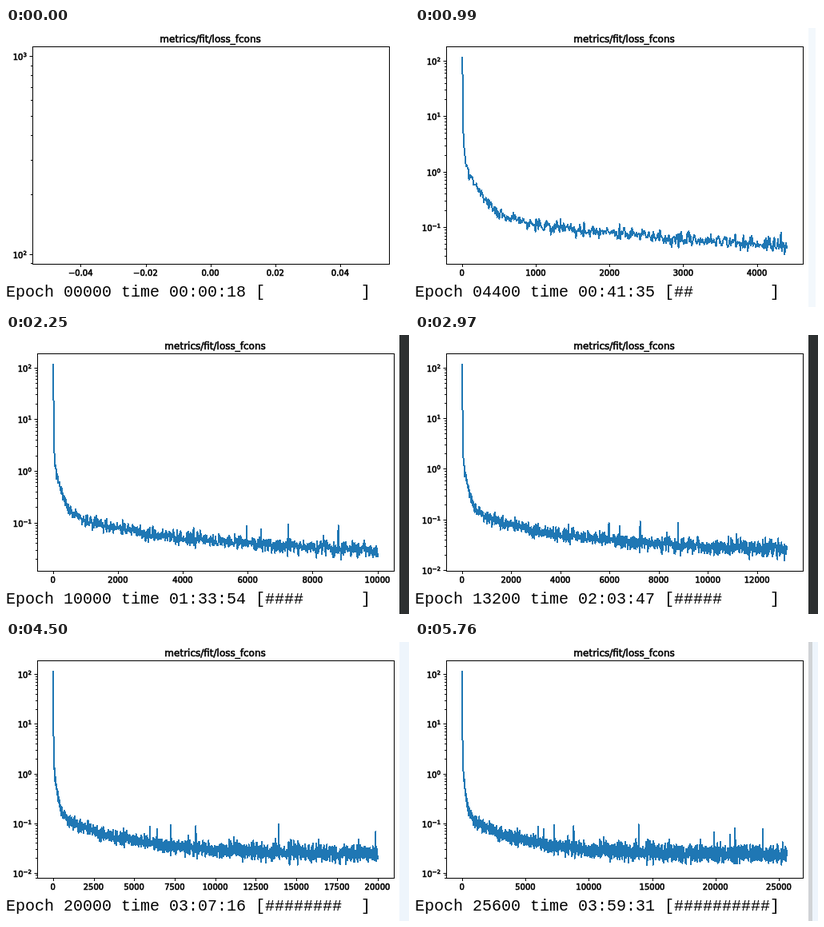
Recreate the animation shown at these times as an HTML page. Size 504 by 349 pixels, loop 5850 ms.

```html
<!DOCTYPE html>
<html lang="en">
<head>
<meta charset="utf-8">
<title>Training loss</title>
<style>
  html, body { margin: 0; width: 100%; height: 100%; overflow: hidden; background: #fff; }
  svg { display: block; }
  text { font: 10px "DejaVu Sans", sans-serif; stroke: #000; stroke-width: .6px; }
  .title { font-size: 12px; }
  .exp { font-size: 7px; }
  .axis { fill: none; stroke: #000; stroke-width: 1; }
  .curve { fill: none; stroke: #1f77b4; stroke-width: 2; stroke-linejoin: round; shape-rendering: crispEdges; }
  #status {
    position: absolute; left: 0; top: 319px; color: #000; white-space: pre;
    font: 20px/23px "Liberation Mono", monospace;
  }
</style>
</head>
<body>
<svg id="stage" width="504" height="349" viewBox="0 0 504 349"></svg>
<div id="status"></div>
<script>
const STEP_MS = 90, STEPS = 65, EPOCHS_PER_STEP = 400, SAMPLE = 10;
const LAST_EPOCH = (STEPS - 1) * EPOCHS_PER_STEP;
const TOP = 23.5, BOTTOM = 295.5, WIDTH = 446.4, HEIGHT = BOTTOM - TOP;
const EDGE_X = 492;
const stage = document.getElementById('stage');
const statusLine = document.getElementById('status');

// Strip at the right edge, by first step
const EDGES = [
  { from: 1, width: 9, colour: '#000' },
  { from: 11, width: 9, colour: '#f3f8fc' },
  { from: 22, width: 12, colour: '#2d3031' },
  { from: 36, width: 12, colour: '#080c10', line: true },
  { from: 47, width: 12, colour: '#eef5fc' },
  { from: 57, width: 5, colour: '#d0d3d6', under: '#eef5fc' }
];

// Seeded generator (mulberry32)
let seed = 20417;
function random() {
  seed = (seed + 0x6D2B79F5) | 0;
  let t = Math.imul(seed ^ (seed >>> 15), seed | 1);
  t ^= t + Math.imul(t ^ (t >>> 7), t | 61);
  return ((t ^ (t >>> 14)) >>> 0) / 4294967296;
}

function gauss() {
  return Math.sqrt(-2 * Math.log(1 - random())) * Math.cos(2 * Math.PI * random());
}

const decay = (size, epoch, life) => size * Math.exp(-epoch / life);

// log10 of the typical loss: a sum of decays from fast to slow
function trend(epoch) {
  return Math.log10(.0243 + decay(113, epoch, 2.5) + decay(6, epoch, 14) +
    decay(1.55, epoch, 138) + decay(.09, epoch, 1000) + decay(.07, epoch, 4000));
}

// log10 of the lowest loss reached by an epoch
function lowestLoss(epoch) {
  const e = Math.min(epoch, 20000);
  return trend(e) - .14 - .158 * e / 20000;
}

function noisyLoss(epoch) {
  if (!epoch) return trend(0);
  const sigma = .055 + .035 * Math.min(1, epoch / 15000);
  const spike = random() < .02 ? decay(.1, Math.log(1 - random()), 1) - .1 : 0;
  const noise = gauss() * sigma + Math.min(spike, .4);
  return Math.max(trend(epoch) + noise, lowestLoss(epoch));
}

const losses = Array.from({ length: LAST_EPOCH / SAMPLE + 1 }, (_, i) => noisyLoss(i * SAMPLE));

const snap = v => Math.floor(v) + .5;
const pad = (n, size) => String(n).padStart(size, '0');
const minus = s => s.replace('-', '\u2212');

function text(x, y, content, anchor = 'middle', cls = '') {
  return `<text class="${cls}" x="${x - .6}" y="${y}" text-anchor="${anchor}">${content}</text>`;
}

function tickStep(range) {
  const raw = range / 9, power = 10 ** Math.floor(Math.log10(raw));
  return [1, 2, 2.5, 5, 10].find(m => m * power >= raw) * power;
}

function xTicks(min, max, toX, digits) {
  const step = tickStep(max - min);
  let out = '';
  for (let n = Math.ceil(min / step); n * step <= max; n++) {
    const x = toX(n * step);
    out += `<path class="axis" d="M${snap(x)} ${BOTTOM}v3.5"/>` +
      text(x, 310, minus((n * step || 0).toFixed(digits)));
  }
  return out;
}

function yTicks(low, high, left, toY) {
  let out = '';
  for (let p = Math.floor(low); p <= high; p++) {
    for (let m = 1; m < 10; m++) {
      const value = p + Math.log10(m);
      if (value < low || value > high) continue;
      const y = toY(value);
      out += `<path class="axis" d="M${left} ${snap(y)}h${m > 1 ? -2 : -3.5}"/>`;
      if (m === 1) out += powerLabel(left - 6.5, snap(y) + 4, p);
    }
  }
  return out;
}

function powerLabel(right, y, p) {
  const x = right - (p < 0 ? 10.3 : 4.5);
  return text(x, y, '10', 'end') + text(x, y - 3.8, minus(String(p)), 'start', 'exp');
}

function curve(epoch, toX, toY) {
  if (!epoch) return '';
  const points = losses.slice(0, epoch / SAMPLE + 1)
    .map((v, i) => toX(i * SAMPLE).toFixed(2) + ' ' + toY(v).toFixed(2));
  return `<path class="curve" d="M${points.join('L')}"/>`;
}

function plot(epoch) {
  const left = epoch ? 39 : 33;
  const lowest = epoch ? lowestLoss(epoch) : 2;
  const highest = epoch ? losses[0] : 3;
  const margin = (highest - lowest) * .05;
  const low = lowest - margin, high = highest + margin;
  const min = epoch ? -.05 * epoch : -.055, max = epoch ? 1.05 * epoch : .055;
  const toX = e => left + (e - min) / (max - min) * WIDTH;
  const toY = v => TOP + (high - v) / (high - low) * HEIGHT;
  return curve(epoch, toX, toY) + xTicks(min, max, toX, epoch ? 0 : 2) +
    yTicks(low, high, left, toY) +
    `<rect class="axis" x="${left + .5}" y="${TOP}" width="446" height="${HEIGHT}"/>` +
    text(left + WIDTH / 2, 17.5, 'metrics/fit/loss_fcons', 'middle', 'title');
}

// Steady pace after a slow start, with a slight drift
function elapsed(epoch) {
  const warmUp = 12 - decay(12, epoch, 1700);
  const drift = 3 * Math.sin(Math.PI * epoch / LAST_EPOCH);
  return Math.floor(18.2 + .5602 * epoch + warmUp + drift);
}

function roundHalfEven(v) {
  return v % 1 === .5 ? 2 * Math.round(v / 2) : Math.round(v);
}

function status(epoch) {
  const s = elapsed(epoch);
  const time = [s / 3600, s / 60 % 60, s % 60].map(n => pad(Math.floor(n), 2)).join(':');
  const bar = '#'.repeat(roundHalfEven(epoch / LAST_EPOCH * 10)).padEnd(10);
  return `Epoch ${pad(epoch, 5)} time ${time} [${bar}]`;
}

function strip(x, width, colour) {
  return `<rect x="${x}" width="${width}" height="349" fill="${colour}"/>`;
}

function edge(step) {
  const e = EDGES.filter(item => item.from <= step).pop();
  if (!e) return '';
  return (e.under ? strip(EDGE_X, 12, e.under) : '') + strip(EDGE_X, e.width, e.colour) +
    (e.line ? strip(EDGE_X + 6.5, 2, '#fff') : '');
}

const start = performance.now();
let shown = -1;
function draw() {
  const step = Math.floor((performance.now() - start) / STEP_MS) % STEPS;
  if (step !== shown) {
    const epoch = step * EPOCHS_PER_STEP;
    stage.innerHTML = edge(step) + plot(epoch);
    statusLine.textContent = status(epoch);
    shown = step;
  }
  requestAnimationFrame(draw);
}
draw();
</script>
</body>
</html>
```
